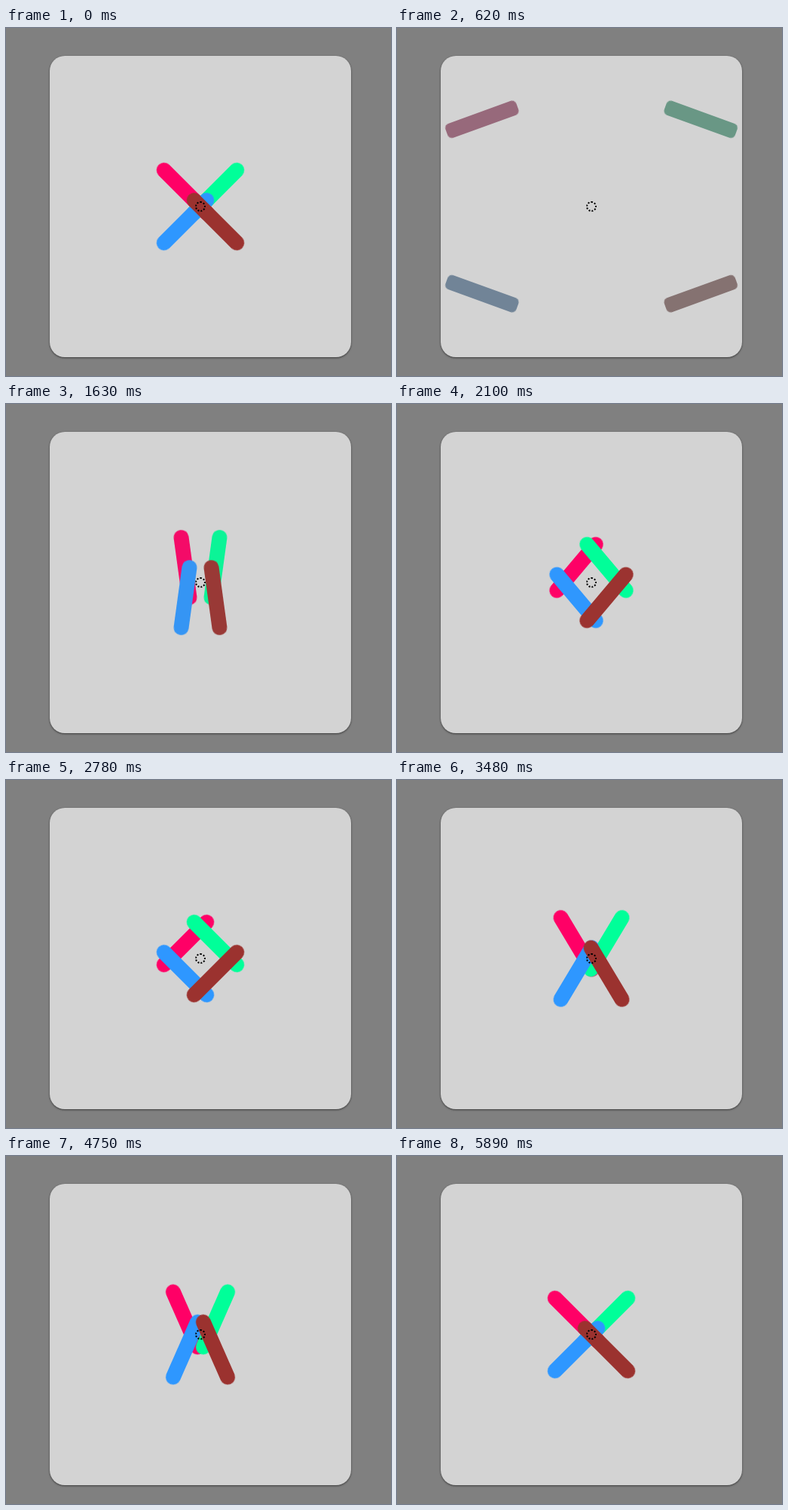
These frames come from a looping animation (511x462 px, 6.31 s). An HTML page:

```html
<!DOCTYPE html>
<html lang="en">
<head>
<meta charset="utf-8">
<title>Crossing bars</title>
<style>
  html, body {
    margin: 0;
    width: 100%;
    height: 100%;
    overflow: hidden;
    background: #808080;
  }
  .card {
    position: absolute;
    left: 58px;
    top: 37px;
    width: 400px;
    height: 400px;
    border-radius: 20px;
    background: #d3d3d3;
    box-shadow: 0 1px 3px rgba(0, 0, 0, .3), 0 1px 2px rgba(0, 0, 0, .3);
  }
  /* --x, --y: quadrant; the spin is mirrored between neighbours */
  .bar {
    --spin: calc(var(--x) * var(--y));
    position: absolute;
    left: calc(150px + var(--x) * 20px);
    top: calc(190px + var(--y) * 20px);
    width: 100px;
    height: 20px;
    border-radius: 10px;
    background: var(--c);
    animation: 6.31s ease infinite;
    animation-name: move, turn, tint;
  }
  .red   { --x: -1; --y: -1; --c: #ff0066; }
  .green { --x: 1;  --y: -1; --c: #00ff99; }
  .blue  { --x: -1; --y: 1;  --c: #2e97ff; }
  .brown { --x: 1;  --y: 1;  --c: #9b322f; }
  .ring {
    position: absolute;
    left: 193px;
    top: 193px;
    width: 10px;
    height: 10px;
    border: 2px dotted #000;
    border-radius: 50%;
  }
  @keyframes move {
    0%, 3.96% { translate: 0 0; }
    8.08% { translate: calc(var(--x) * 140px) calc(var(--y) * 107px); }
    24.56%, 100% { translate: 0 0; }
  }
  @keyframes turn {
    0%, 5.1% { rotate: calc(var(--spin) * 45deg); }
    37%, 45.17% { rotate: calc(var(--spin) * 675deg); }
    65.7% { rotate: calc(var(--spin) * 1035deg); }
    86.37%, 100% { rotate: calc(var(--spin) * 945deg); }
  }
  @keyframes tint {
    0%, 3.96% { background: var(--c); border-radius: 10px; }
    5.1% { background: #808080; border-radius: 5px; }
    37%, 100% { background: var(--c); border-radius: 10px; }
  }
</style>
</head>
<body>
<div class="card">
  <div class="bar red"></div>
  <div class="bar green"></div>
  <div class="bar blue"></div>
  <div class="bar brown"></div>
  <div class="ring"></div>
</div>
</body>
</html>
```
